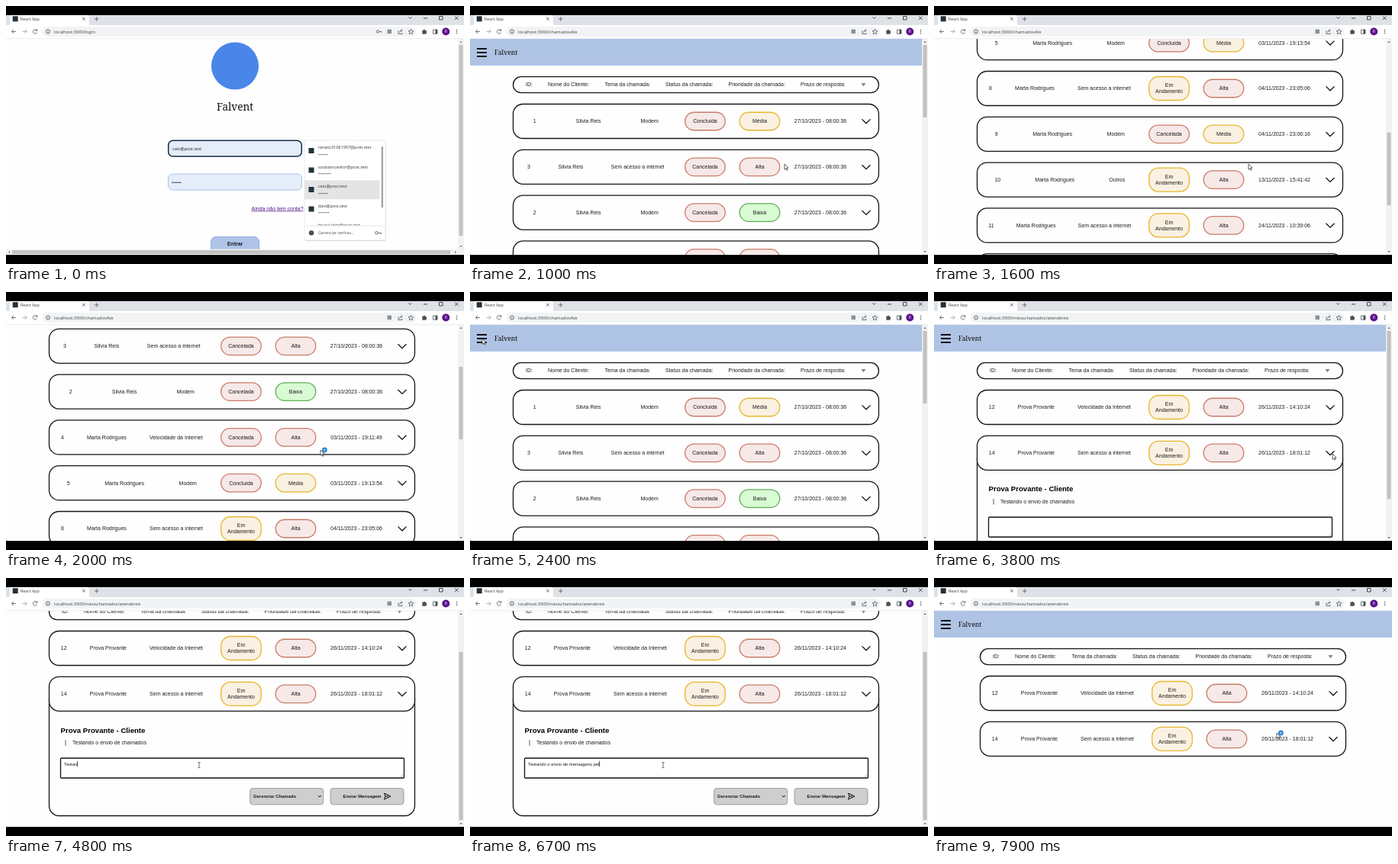
Write an HTML page that moves like this. It is 600 px wide and 338 px high and loops after 8 s.

```html
<!DOCTYPE html>
<html lang="pt-BR">
<head>
<meta charset="utf-8">
<title>React App</title>
<style>
  html, body { margin: 0; width: 100%; height: 100%; overflow: hidden; background: #000; }
  svg { display: block; width: 100vw; height: 100vh; }
  text { font-family: "Liberation Sans", Arial, sans-serif; font-size: 7px; fill: #1c1c1c; white-space: pre; }
  .ui { font-family: "Open Sans", sans-serif; }
  .brand { font-family: "Noto Serif", serif; font-weight: 500; fill: #111; }
  .mid { text-anchor: middle; }
  .bold { font-weight: 700; }
  .line { fill: none; stroke: #5f6368; stroke-width: .9; }
  .box { fill: #fefefe; stroke: #151515; stroke-width: 1.3; }
</style>
</head>
<body>
<svg id="stage" viewBox="0 0 600 338" preserveAspectRatio="none"></svg>
<script>
const LOOP = 8000, PITCH = 59.8, VIEW = 283;
const BRAND = "Falvent", CLIENT = "Prova Provante";
const AGENT = "Marta Rodrigues", OTHER = "Silvia Reis";
const MESSAGE = "Testando o envio de mensagens pelo chat";

const measurer = document.createElement("canvas").getContext("2d");
function widthOf(text, size = 7) {
  measurer.font = `70px "Liberation Sans", Arial, sans-serif`;
  return measurer.measureText(text).width * size / 70;
}

const text = (x, y, str, cls = "", size = 7, extra = "") =>
  `<text x="${x}" y="${y}" class="${cls}" style="font-size:${size}px;${extra}">${str}</text>`;
const rect = (x, y, w, h, r, extra) =>
  `<rect x="${x}" y="${y}" width="${w}" height="${h}" rx="${r}" ${extra}/>`;
const circle = (x, y, r, extra) => `<circle cx="${x}" cy="${y}" r="${r}" ${extra}/>`;
const path = (d, extra = 'class="line"') => `<path d="${d}" ${extra}/>`;
const group = (id, body, extra = "") => `<g id="${id}" ${extra}>${body}</g>`;

const TONES = {
  amber: 'fill="#fbf1e2" stroke="#e5b62d"',
  red: 'fill="#f6e9e8" stroke="#cb7b69"',
  green: 'fill="#d8fbd4" stroke="#62ad57"'
};
const TONE_OF = { "Em Andamento": "amber", "Média": "amber", "Baixa": "green" };

function badge(cx, cy, label) {
  const words = label.split(" "), h = words.length > 1 ? 31 : 23.5;
  const tone = TONES[TONE_OF[label] || "red"];
  const lines = words.map((w, i) =>
    text(cx, cy + 2.3 + 8 * (i - (words.length - 1) / 2), w, "mid")).join("");
  return rect(cx - 26.3, cy - h / 2, 52.6, h, Math.min(h / 2, 12.5), `${tone} stroke-width="1.3"`) + lines;
}

function row(index, [id, name, theme, status, priority, date]) {
  const cy = 151 + PITCH * index, cells = [id, name, theme];
  const widths = cells.map(c => widthOf(c));
  const gap = (216 - widths.reduce((a, b) => a + b)) / 3;
  let x = 60.8 + gap / 2;
  const labels = cells.map((c, i) => {
    const cell = text(x, cy + 2.3, c);
    x += widths[i] + gap;
    return cell;
  }).join("");
  return rect(60.5, cy - 22.5, 479, 45, 13, 'class="box"') + labels +
    badge(312, cy, status) + badge(383.5, cy, priority) +
    text(463, cy + 2.3, date, "mid") +
    path(`M517.5 ${cy - 2.6}l5.5 5.4 5.5-5.4`, 'fill="none" stroke="#111" stroke-width="1.3"');
}

const titleBar = rect(0, 43, 600, 35, 0, 'fill="#afc3e5"') +
  path("M9 56h13M9 61h13M9 66h13", 'stroke="#111" stroke-width="2"') +
  text(32, 64, BRAND, "brand", 8.6);

const columns = rect(60.5, 92.7, 479, 21, 10.5, 'class="box"') +
  [[77, "ID:"], [106, "Nome do Cliente:"], [180.5, "Tema da chamada:"], [260, "Status da chamada:"],
   [342.5, "Prioridade da chamada:"], [437, "Prazo de resposta:"]]
    .map(([x, label]) => text(x, 105.4, label)).join("") +
  path("M516.5 101h6l-3 4.5z", 'fill="#888"');

const BUSY = "Em Andamento", NO_NET = "Sem acesso a internet", SPEED = "Velocidade da Internet";
const openCalls = [
  ["12", CLIENT, SPEED, BUSY, "Alta", "26/11/2023 - 14:10:24"],
  ["14", CLIENT, NO_NET, BUSY, "Alta", "26/11/2023 - 18:01:12"]
];
const allCalls = [
  ["1", OTHER, "Modem", "Concluída", "Média", "27/10/2023 - 08:00:36"],
  ["3", OTHER, NO_NET, "Cancelada", "Alta", "27/10/2023 - 08:00:36"],
  ["2", OTHER, "Modem", "Cancelada", "Baixa", "27/10/2023 - 08:00:36"],
  ["4", AGENT, SPEED, "Cancelada", "Alta", "03/11/2023 - 19:11:49"],
  ["5", AGENT, "Modem", "Concluída", "Média", "03/11/2023 - 19:13:54"],
  ["8", AGENT, NO_NET, BUSY, "Alta", "04/11/2023 - 23:05:06"],
  ["9", AGENT, "Modem", "Cancelada", "Média", "04/11/2023 - 23:06:16"],
  ["10", AGENT, "Outros", BUSY, "Alta", "13/11/2023 - 15:41:42"],
  ["11", AGENT, NO_NET, BUSY, "Alta", "24/11/2023 - 10:39:06"],
  ...openCalls
];

const panel = group("panel",
  rect(60.5, 205, 479, 165.5, 13, 'class="box"') +
  text(75.5, 261.5, CLIENT + " - Cliente", "bold", 9.6, "fill:#000") +
  path("M82 271v7.5", 'stroke="#333" stroke-width=".8"') +
  text(91, 277.3, "Testando o envio de chamados") +
  rect(75.5, 295, 450, 26, 1, 'fill="#fff" stroke="#111" stroke-width="1.3"') +
  path("M521 320l3.5-3.5M523 320l1.5-1.5", 'stroke="#777" stroke-width=".5"') +
  group("typed", text(80, 304.6, "", "", 5.83)) +
  path("M0 298.7v7.5", 'id="caret" stroke="#000" stroke-width=".7"') +
  [323.7, 429].map(x => rect(x, 334.5, 96, 21.3, 3.5, 'fill="#cecece" stroke="#8d8d8d" stroke-width=".8"')).join("") +
  text(328, 347.2, "Gerenciar Chamado", "bold", 5.9) +
  path("M413 344l2 2 2-2", 'fill="none" stroke="#111" stroke-width="1"') +
  text(445.5, 347.2, "Enviar Mensagem", "bold", 5.9) +
  path("M499.5 341l8.5 4-8.5 4 1.5-4zM501 345h4", 'fill="none" stroke="#111" stroke-width="1"'));

const accounts = [["renato31081997", 6], ["soubiancavitor", 8], ["caio", 6], ["davi", 7], ["bruna.leite", 6]];
const popup = group("popup",
  rect(391.5, 177, 106, 131, 2, 'fill="#000" opacity=".14"') +
  rect(391, 176, 106, 131, 2, 'fill="#fff" stroke="#ddd" stroke-width=".6"') +
  rect(391, 228.3, 98.5, 25, 0, 'fill="#e4e4e4"') +
  `<g clip-path="url(#accountsClip)">` + accounts.map(([user, dots], i) => {
    const y = 187 + 25.5 * i;
    return rect(396.5, y - 1, 7, 7, 0, 'fill="#24323a"') +
      text(409, y, user + "@post.test", "ui", 5.5, "fill:#333") +
      text(409, y + 9.6, "•".repeat(dots), "ui", 5.6, "fill:#333");
  }).join("") + "</g>" +
  rect(491.7, 184, 2.4, 80, 1, 'fill="#a5a5a5"') +
  path("M391 288h106", 'stroke="#ddd" stroke-width=".7"') +
  circle(400, 297.3, 3.2, 'fill="#4b4f54"') +
  text(409, 299.4, "Gerenciar senhas...", "ui", 5.3, "fill:#555") +
  circle(485.5, 297.3, 1.8, 'class="line"') + path("M487.5 297.3h4v1.6"));

const login = group("login",
  circle(300, 78.5, 31, 'fill="#4a86e8"') +
  text(300, 137, BRAND, "brand mid", 13.6) +
  rect(212.7, 176.2, 174.6, 20.8, 6, 'fill="#e5edf9" stroke="#14294a" stroke-width="1.5"') +
  text(218, 189.4, "caio@post.test", "ui", 5.6) +
  rect(212.5, 220, 175, 21, 6, 'fill="#e5edf9" stroke="#a9c3e9" stroke-width="1"') +
  text(217, 233.2, "••••••", "", 6) +
  text(321.5, 267.6, "Ainda não tem conta?", "", 7, "fill:#551a8b;text-decoration:underline") +
  rect(268.5, 302.3, 63, 22, 6.5, 'fill="#afc4e8" stroke="#8cabdc" stroke-width="1"') +
  text(300, 314, "Entrar", "bold mid", 7) +
  rect(592, 43, 8, 283, 0, 'fill="#f2f2f2"') +
  rect(593.5, 51, 5, 250, 0, 'fill="#c3c3c3"') +
  rect(0, 318.5, 600, 8, 0, 'fill="#f2f2f2"') +
  rect(8, 320, 574, 5, 0, 'fill="#c3c3c3"') +
  path("M594.3 48l1.7-2 1.7 2zM594.3 314l1.7 2 1.7-2zM5 320.8l-2 1.7 2 1.7zM588 320.8l2 1.7-2 1.7z", 'fill="#777"') +
  popup);

const scrollbar = group("scrollbar",
  rect(592, 43, 8, 283, 0, 'fill="#f2f2f2"') +
  '<rect id="thumb" x="593.5" width="5" fill="#c1c1c1"/>' +
  path("M594.3 48l1.7-2 1.7 2zM594.3 321l1.7 2 1.7-2z", 'fill="#666"'));

const status = group("status",
  rect(0, 317, 102, 9.5, 1, 'fill="#eceef3"') +
  text(2, 323.4, "localhost:3000/meuschamados/atendente", "ui", 4.9, "fill:#777"));

const chrome =
  rect(0, 12, 600, 13.5, 0, 'fill="#dee1e6"') +
  path("M3 25.5q2 0 2-2.500V14.500q0-2.500 2.500-2.500h99q2.500 0 2.500 2.500V23q0 2.500 2 2.500z", 'fill="#fff"') +
  rect(8.7, 13.3, 7, 7, 0, 'fill="#22303a"') +
  text(19, 19, "React App", "ui", 5.3, "fill:#3c4043") +
  path("M100 15l3.600 3.600m0-3.600l-3.600 3.600M116 17h5.400m-2.700-2.700v5.400") +
  path("M527.500 14.500l2 2 2-2M547 16h5M567.500 13.500h4.500v4.500h-4.500zM588 13.500l4.500 4.500m0-4.500l-4.500 4.500", 'fill="none" stroke="#222" stroke-width=".8"') +
  rect(0, 25, 600, 18, 0, 'fill="#fff"') +
  rect(47.5, 27, 490, 13, 6.5, 'fill="#f1f3f4"') +
  path("M13 33.500H7.500m2.500-2.500l-2.500 2.500 2.500 2.500") +
  path("M21.500 33.500H27m-2.500-2.500l2.500 2.500-2.500 2.500", 'class="line" opacity=".55"') +
  path("M40.300 32a2.700 2.700 0 1 0 .2 2.500M40.700 30v2.300h-2.300") +
  circle(55, 33.5, 2.6, 'class="line"') + path("M55 33v2M55 31.700v.6") +
  '<text id="url" x="63" y="35.600" class="ui" style="font-size:5.75px;fill:#3c4043"></text>' +
  group("key", circle(487, 33.5, 1.7, 'class="line"') + path("M489 33.500h3v1.500")) +
  rect(499.5, 30.7, 5.5, 5.5, 0, 'fill="#8b9097"') +
  path("M514 32.500v4h5v-1.500M515.500 34.500q.4-2.500 3.500-2.500m-1.500-1.700l1.700 1.700-1.700 1.700") +
  path("M530.500 30.300l1 2.300 2.400.2-1.800 1.600.5 2.400-2.100-1.300-2.100 1.300.5-2.400-1.800-1.600 2.400-.2z") +
  path("M545.300 31.700h1.600a1 1 0 0 1 2 0h1.600v1.500a1 1 0 0 1 0 2v1.500h-5.200z", 'fill="#4d5156"') +
  path("M559.500 31h5.500v5.300h-5.500z") + rect(562.5, 31, 2.5, 5.3, 0, 'fill="#4d5156"') +
  circle(576.3, 33.5, 5, 'fill="#5a128c"') +
  text(576.3, 35.3, "R", "ui mid", 4.8, "fill:#fff") +
  [31.2, 33.5, 35.8].map(y => circle(590.5, y, .7, 'fill="#4d5156"')).join("") +
  path("M0 42.700h600", 'stroke="#dfe1e5" stroke-width=".6"');

const cursor = group("cursor",
  path("M0 0v7.200l1.700-1.500 1.200 2.500 1.100-.5-1.200-2.500h2.300z", 'id="arrow" fill="#fff" stroke="#222" stroke-width=".7"') +
  path("M-1.500-3.500h1.200l.3.300.300-.3h1.200M0-3.200v6.400M-1.500 3.500h1.200l.3-.3.300.3h1.200", 'id="beam" fill="none" stroke="#333" stroke-width=".7"') +
  group("busy", circle(5.4, 0, 3.4, 'fill="#2f83d3"') + circle(5.4, 0, 1.3, 'fill="#a9d3f3"')));

const stage = document.getElementById("stage");
stage.innerHTML = `
  <defs>
    <clipPath id="pageClip"><rect y="43" width="600" height="${VIEW}"/></clipPath>
    <clipPath id="accountsClip"><rect x="391" y="176" width="100" height="111.500"/></clipPath>
  </defs>` +
  rect(0, 0, 600, 338, 0, "") + rect(0, 43, 600, VIEW, 0, 'fill="#fefefe"') +
  `<g clip-path="url(#pageClip)">` +
    login +
    group("bar", titleBar) +
    group("list", columns + allCalls.map((call, i) => row(i, call)).join("")) +
    group("mine", columns + row(0, openCalls[0]) + panel + row(1, openCalls[1])) +
    scrollbar + status +
  "</g>" + chrome + cursor;

const $ = id => document.getElementById(id);
const typed = $("typed").firstChild;
const show = (id, on) => $(id).setAttribute("display", on ? "inline" : "none");
const move = (id, x, y) => $(id).setAttribute("transform", `translate(${x} ${y})`);
const within = (t, from, to) => t >= from && t < to;

// Eased interpolation through [time, ...values] keys.
function track(t, keys) {
  if (t <= keys[0][0]) return keys[0].slice(1);
  const i = keys.findIndex(k => k[0] > t);
  if (i < 0) return keys[keys.length - 1].slice(1);
  const [a, b] = [keys[i - 1], keys[i]];
  const p = (t - a[0]) / (b[0] - a[0]), e = p * p * (3 - 2 * p);
  return a.slice(1).map((v, n) => v + (b[n + 1] - v) * e);
}

const POINTER = [
  [200, 440, 240], [450, 300, 311], [650, 300, 311], [1000, 412, 207], [2150, 412, 207],
  [2400, 16, 61], [2500, 16, 61], [2620, 40, 112], [2750, 40, 112], [3000, 341, 218], [3050, 341, 218],
  [3450, 522, 212], [3800, 522, 212], [4250, 253, 245], [7080, 253, 245], [7250, 466, 279],
  [7400, 466, 279], [7700, 449, 203]
];
const LIST_SCROLL = [[1000, 0], [1550, 342], [1650, 342], [2000, 140], [2250, 0]];
const MINE_SCROLL = [[3800, 0], [4100, 59]];

function render(t) {
  const page = t < 600 ? "login" : t < 2750 ? "list" : "mine";
  const opened = within(t, 3650, 7350);
  const hasBar = page === "list" || opened;
  const scroll = page === "list" ? track(t, LIST_SCROLL)[0] : opened ? track(t, MINE_SCROLL)[0] : 0;

  for (const id of ["login", "list", "mine"]) show(id, id === page);
  show("bar", page !== "login");
  show("key", page === "login");
  show("popup", t < 200);
  show("panel", opened);
  show("scrollbar", hasBar);
  show("status", within(t, 2560, 3080));
  $("status").setAttribute("opacity", t < 2800 ? 1 : .5);
  $("url").textContent = "localhost:3000/" +
    { login: "login", list: "chamadosAte", mine: "meuschamados/atendente" }[page];

  move("bar", 0, -scroll);
  if (page !== "login") move(page, hasBar ? -4 : 0, -scroll);
  if (hasBar) {
    const ratio = 266 / (page === "list" ? 792 : VIEW + 59);
    $("thumb").setAttribute("y", 51 + scroll * ratio);
    $("thumb").setAttribute("height", VIEW * ratio);
  }

  const count = Math.max(0, Math.floor(6.5 + (t - 4800) * 27 / 1900));
  typed.textContent = MESSAGE.slice(0, count);
  $("caret").setAttribute("transform", `translate(${80.3 + widthOf(typed.textContent, 5.83)} 0)`);
  show("caret", t >= 4300);

  const beam = within(t, 4200, 7120);
  show("cursor", t >= 200);
  show("arrow", !beam);
  show("beam", beam);
  show("busy", within(t, 600, 900) || within(t, 1900, 2100) || within(t, 2750, 3200) || t >= 7350);
  move("cursor", ...track(t, POINTER));
}

const start = performance.now();
function tick() {
  render((performance.now() - start) % LOOP);
  requestAnimationFrame(tick);
}
tick();
</script>
</body>
</html>
```
